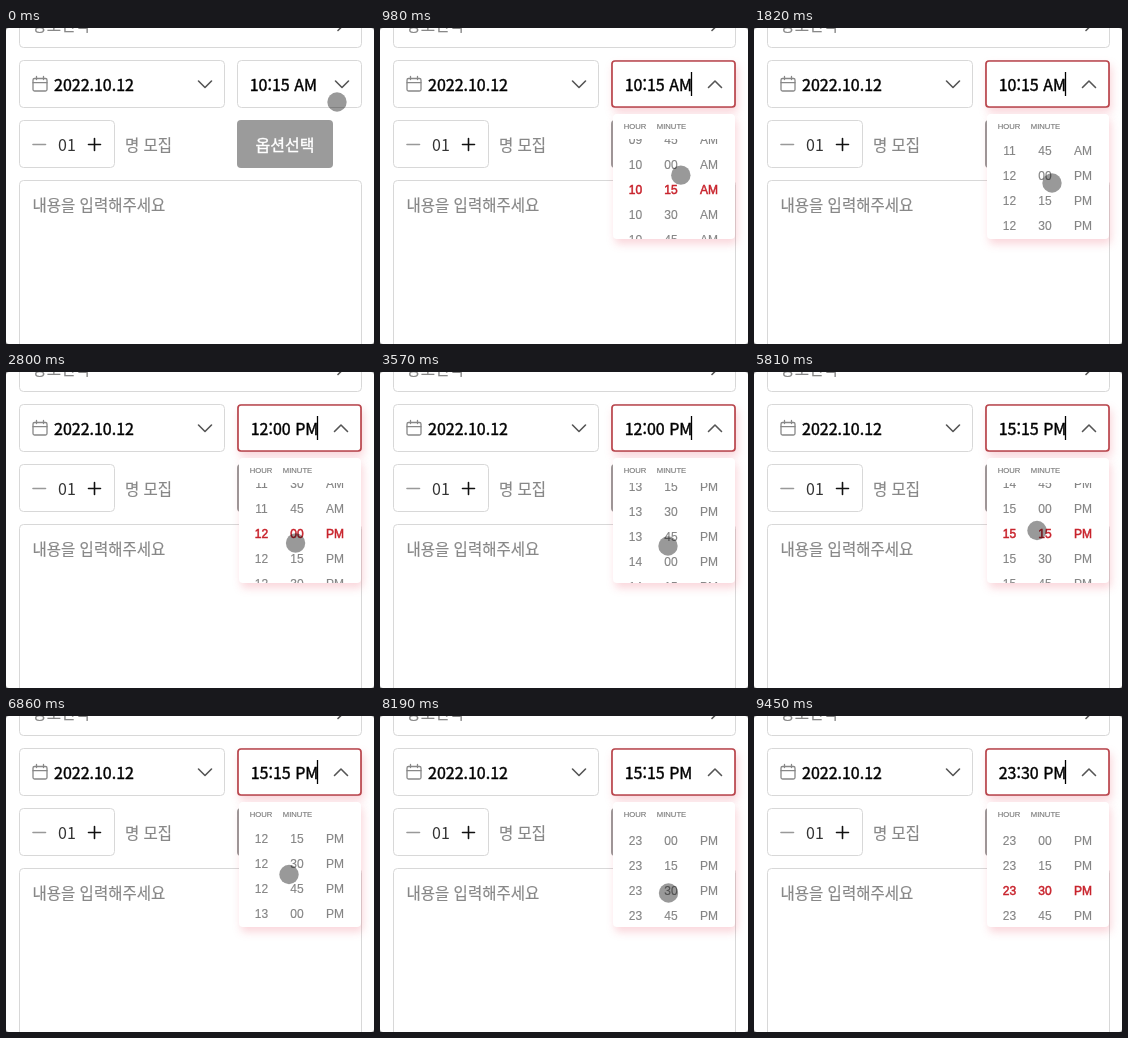
Animation, 368 px wide and 316 px high, one loop 9590 ms. Source, as an HTML page:

```html
<!DOCTYPE html>
<html lang="ko">
<head>
<meta charset="utf-8">
<style>
  html, body { margin: 0; width: 100%; height: 100%; overflow: hidden; background: #888; }
  svg { display: block; width: 368px; height: 316px; }
  text { font: 16px "Noto Sans CJK KR", "Noto Sans CJK", sans-serif; font-feature-settings: "calt" 0; fill: #111; }
  .box { fill: #fff; stroke: #d8d8d8; }
  .icon { fill: none; stroke: #555; stroke-width: 1.6; stroke-linecap: round; stroke-linejoin: round; }
  .strong { fill: #000; stroke: #000; stroke-width: .4; }
  .hint { font-size: 15.5px; fill: #888; stroke: #888; stroke-width: .2; }
  .glow { filter: drop-shadow(2px 5px 4px rgba(225, 30, 55, .18)); }
  .menu text { font: 12px "Liberation Sans", Arial, sans-serif; fill: #858585; stroke: #858585; stroke-width: .15; text-anchor: middle; }
  .menu .head { font-size: 7.7px; fill: #777; }
  .menu .picked text { fill: #c8232c; stroke: #c8232c; stroke-width: .5; }
</style>
</head>
<body>
<svg viewBox="0 0 368 316">
  <defs><clipPath id="list"><rect x="233" y="111" width="122" height="100"/></clipPath></defs>
  <rect width="368" height="316" rx="3" fill="#fff"/>

  <rect class="box" x="13.5" y="-28.5" width="342" height="48" rx="4"/>
  <text class="hint" x="26.5" y="3">장소선택</text>
  <path class="icon" d="M332 2.5L337 -2.5"/>

  <rect class="box" x="13.5" y="32.5" width="205" height="47" rx="4"/>
  <g class="icon" style="stroke:#888;stroke-width:1.3">
    <rect x="27" y="50.5" width="14" height="12.5" rx="1.5"/>
    <path d="M27 54.7h14M30.5 48.5v3M37.5 48.5v3"/>
  </g>
  <text class="strong" x="48" y="63.3">2022.10.12</text>
  <path class="icon" d="M192.5 53L199 59.5L205.5 53"/>

  <rect class="box" x="13.5" y="92.5" width="95" height="47" rx="4"/>
  <path class="icon" style="stroke:#999" d="M27 116.5h12.5"/>
  <text x="52" y="123" style="fill:#333">01</text>
  <path class="icon" d="M82.5 116.5h12M88.5 110.5v12" style="stroke:#111"/>
  <text class="hint" x="119" y="122.5">명 모집</text>
  <rect x="231" y="92" width="96" height="48" rx="4" fill="#9b9b9b"/>
  <text class="strong" x="249.5" y="122.5" style="fill:#fff;stroke:#fff">옵션선택</text>

  <rect class="box" x="13.5" y="152.5" width="342" height="200" rx="4"/>
  <text class="hint" x="26.5" y="183">내용을 입력해주세요</text>

  <rect class="box" x="231.5" y="32.5" width="124" height="47" rx="4"/>
  <g id="focus">
    <rect class="glow" x="232" y="33" width="123" height="46" rx="3" fill="#fff" stroke="#bb464d" stroke-width="1.7"/>
    <g class="menu">
      <rect class="glow" x="233" y="86" width="122" height="125" rx="4" fill="#fff"/>
      <text class="head" x="255" y="100.8">HOUR</text>
      <text class="head" x="291.5" y="100.8">MINUTE</text>
      <g clip-path="url(#list)"><g id="rows"></g></g>
    </g>
  </g>
  <text class="strong" id="value" y="63.3"></text>
  <path class="icon" id="arrow"/>
  <path id="caret" d="M311.5 44v24" stroke="#000" stroke-width="1.3"/>

  <circle id="ripple"/>
  <circle id="cursor" r="9.7" opacity=".4"/>
</svg>
<script>
const LOOP = 9590, STEP = 70, ROW = 25, CENTER = 161;
const FOCUS = 600, BLINK = 500, PRESS = 200, RIPPLE = 280;
const LAST_SCROLL = 93.48;
const $ = id => document.getElementById(id);
const set = (el, attrs) => { for (const k in attrs) el.setAttribute(k, attrs[k]); };
const pad = n => String(n).padStart(2, "0");
const clamp = p => Math.max(0, Math.min(1, p));
const smooth = p => p * p * (3 - 2 * p);
const easeOut = p => p * (2 - p);

// A slot counts quarter hours since midnight.
const slotParts = i => [pad(i >> 2), pad(i % 4 * 15), i < 48 ? "AM" : "PM"];
const slotText = i => { const [h, m, half] = slotParts(i); return `${h}:${m} ${half}`; };

const COLUMNS = [255.5, 291, 329];
$("rows").innerHTML = Array.from({ length: 96 }, (_, i) =>
  `<g>${slotParts(i).map((s, c) => `<text x="${COLUMNS[c]}" y="${i * ROW + 4.7}">${s}</text>`).join("")}</g>`
).join("");

const stop = (time, duration, ...values) => ({ time, duration, values });

const picks = [stop(0, 1, 41), stop(2360, 1, 48), stop(4110, 1, 55), stop(5440, 1, 61), stop(8400, 1, 94)];
const flicks = [[1400, 48.56], [3010, 54.88], [4690, 60.7], [5880, 55], [6440, 50.56], [6860, 48], [7770, LAST_SCROLL]]
  .map(([time, slot]) => stop(time, 420, slot));
const moves = [[-280, 331, 74], [0, 331.5, 62], [750, 298, 155], [2590, 288, 174],
  [4270, 286, 168], [5530, 283, 158.5], [7840, 288.5, 177], [8920, 206, 335]]
  .map(([time, x, y]) => stop(time, 280, x, y));

// Picking a slot brings it to the middle of the list.
const centred = picks.map(p => stop(p.time, p.duration, Math.min(p.values[0], LAST_SCROLL)));
const scrolls = [...flicks, ...centred].sort((a, b) => a.time - b.time);

function glide(stops, t, ease) {
  const i = stops.findLastIndex(s => s.time <= t);
  const to = stops[i], from = stops[i - 1] || to;
  const p = ease(clamp((t - to.time) / to.duration));
  return to.values.map((v, k) => from.values[k] + (v - from.values[k]) * p);
}

function draw(t) {
  const focused = t >= FOCUS;
  const pick = picks.findLast(p => p.time <= t);
  const slot = pick.values[0];
  const [scroll] = glide(scrolls, t, easeOut);
  const [x, y] = glide(moves, t, smooth);

  set($("focus"), { opacity: clamp((t - FOCUS + STEP) / 280) });
  set($("rows"), { transform: `translate(0 ${CENTER - scroll * ROW})` });
  [...$("rows").children].forEach((row, i) => row.classList.toggle("picked", i === slot));

  set($("value"), { x: focused ? 244.7 : 243.7 });
  $("value").textContent = slotText(slot);
  set($("arrow"), { d: focused ? "M328.5 59.5L335 53L341.5 59.5" : "M329.5 53L336 59.5L342.5 53" });

  // Every pick restarts the blinking.
  const blinkStart = Math.max(FOCUS, pick.time);
  const caretOn = focused && (t - blinkStart) % (2 * BLINK) < BLINK;
  set($("caret"), { opacity: caretOn ? 1 : 0 });

  const press = [FOCUS, ...picks.slice(1).map(p => p.time)].map(time => time - PRESS).findLast(time => time <= t);
  const p = press === undefined ? 1 : clamp((t - press) / RIPPLE);
  set($("ripple"), { cx: x, cy: y, r: 10 + 14 * p, opacity: 0.15 * (p > 0.1) * (1 - p) });
  set($("cursor"), { cx: x, cy: y });
}

function tick(now) {
  draw(Math.floor(now % LOOP / STEP) * STEP);
  requestAnimationFrame(tick);
}
draw(0);
requestAnimationFrame(tick);
</script>
</body>
</html>
```
